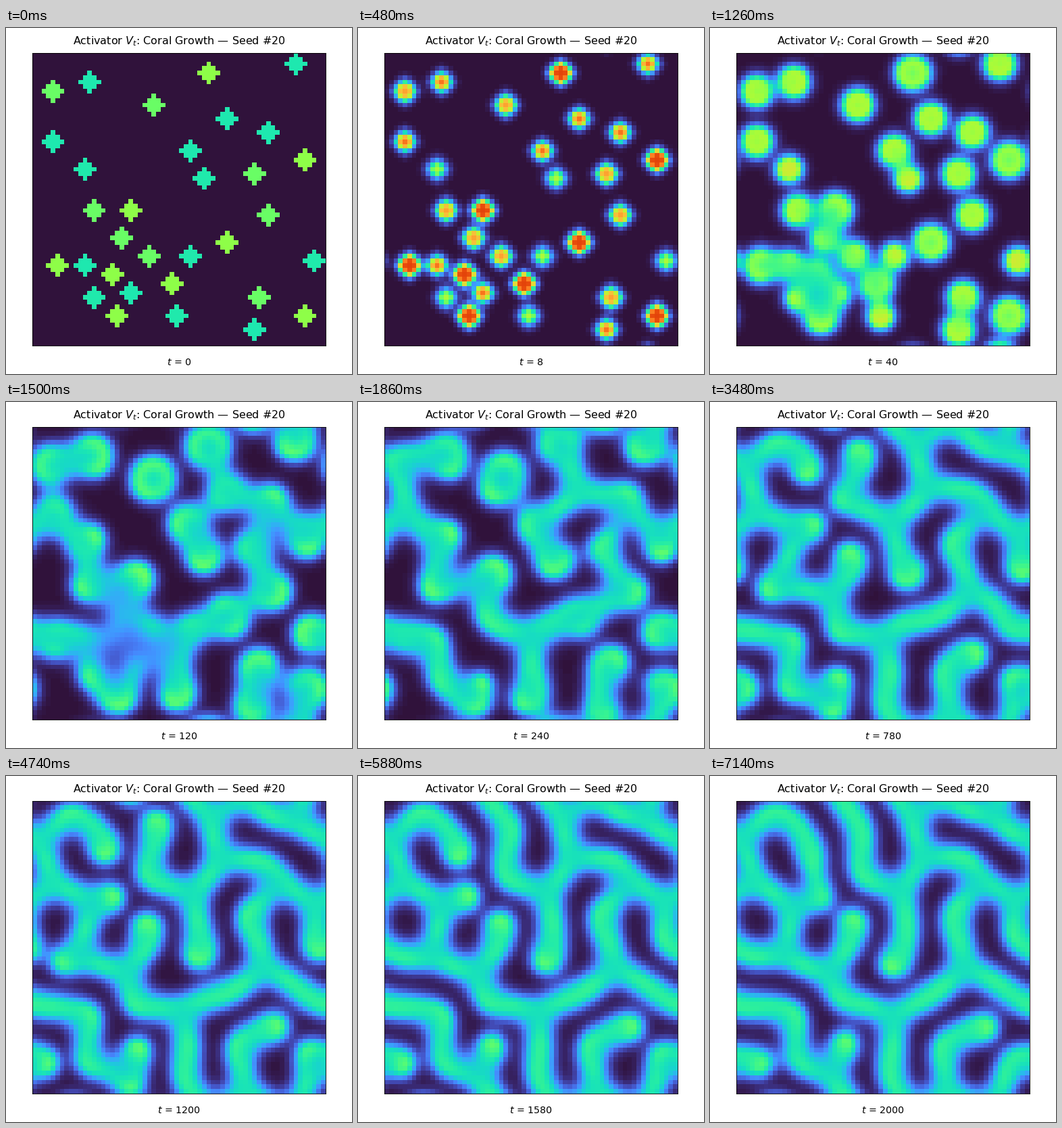
Recreate the animation shown at these times as a matplotlib script. Size 512 by 512 pixels, loop 8 s.

```python
import numpy as np
import matplotlib.pyplot as plt
from matplotlib.animation import FuncAnimation

STAGE, DPI = 512, 128
SIZE = 64
FEED, KILL = 0.0545, 0.062
DIFF_U, DIFF_V = 0.16, 0.08
TIMES = [*range(20), *range(20, 2001, 20)]
TICK, STEP, LOOP = 20, 60, 8000  # ms

# (inhibitor, activator) inside a seed -> its cells as (column, row)
SEEDS = {
    (0.50, 0.35): [(11, 25), (37, 27), (34, 44), (61, 45), (13, 53), (31, 57)],
    (0.74, 0.345): [(57, 2), (12, 6), (42, 14), (51, 17), (4, 19), (34, 21),
                    (11, 46), (21, 52), (48, 60)],
    (0.51, 0.435): [(4, 8), (26, 11), (48, 26), (13, 34), (51, 35), (19, 40),
                    (25, 44), (49, 53)],
    (0.68, 0.475): [(38, 4), (59, 23), (21, 34), (42, 41), (5, 46), (17, 48),
                    (30, 50), (18, 57), (59, 57)],
}


def laplacian(a):
    return sum(np.roll(a, shift, axis)
               for shift in (1, -1) for axis in (0, 1)) - 4 * a


def initial_state():
    u, v = np.ones((SIZE, SIZE)), np.zeros((SIZE, SIZE))
    rows, cols = np.mgrid[:SIZE, :SIZE]
    for (u0, v0), cells in SEEDS.items():
        for col, row in cells:
            disc = (cols - col) ** 2 + (rows - row) ** 2 <= 4
            u[disc], v[disc] = u0, v0
    return u, v


def simulate():
    """Gray-Scott reaction on a torus; activator snapshots at TIMES."""
    u, v = initial_state()
    wanted, snapshots = set(TIMES), []
    for t in range(TIMES[-1] + 1):
        if t in wanted:
            snapshots.append(v)
        reaction = u * v * v
        u, v = (u + DIFF_U * laplacian(u) - reaction + FEED * (1 - u),
                v + DIFF_V * laplacian(v) + reaction - (FEED + KILL) * v)
    return snapshots


snapshots = simulate()

plt.rcParams["font.family"] = "DejaVu Sans"
fig = plt.figure(figsize=(STAGE / DPI, STAGE / DPI), dpi=DPI, facecolor="white")
left, top, side = 39.2, 36.7, 433.6
ax = fig.add_axes([left / STAGE, 1 - (top + side) / STAGE,
                   side / STAGE, side / STAGE])
ax.set(xticks=[], yticks=[])
for spine in ax.spines.values():
    spine.set_linewidth(0.5)
image = ax.imshow(snapshots[0], cmap="turbo", vmin=0, vmax=1,
                  interpolation="nearest", aspect="auto")


def caption(y, text, size):
    return fig.text(0.5005, 1 - y / STAGE, text, fontsize=size,
                    ha="center", va="baseline")


caption(24, "Activator $V_t$: Coral Growth — Seed #20", 9)
clock = caption(499, "", 8)


def draw(i):
    k = min(i * TICK // STEP, len(TIMES) - 1)
    image.set_data(snapshots[k])
    clock.set_text(f"$t$ = {TIMES[k]}")
    return image, clock


anim = FuncAnimation(fig, draw, frames=LOOP // TICK, interval=TICK,
                     repeat=True, repeat_delay=0)
plt.show()
```
